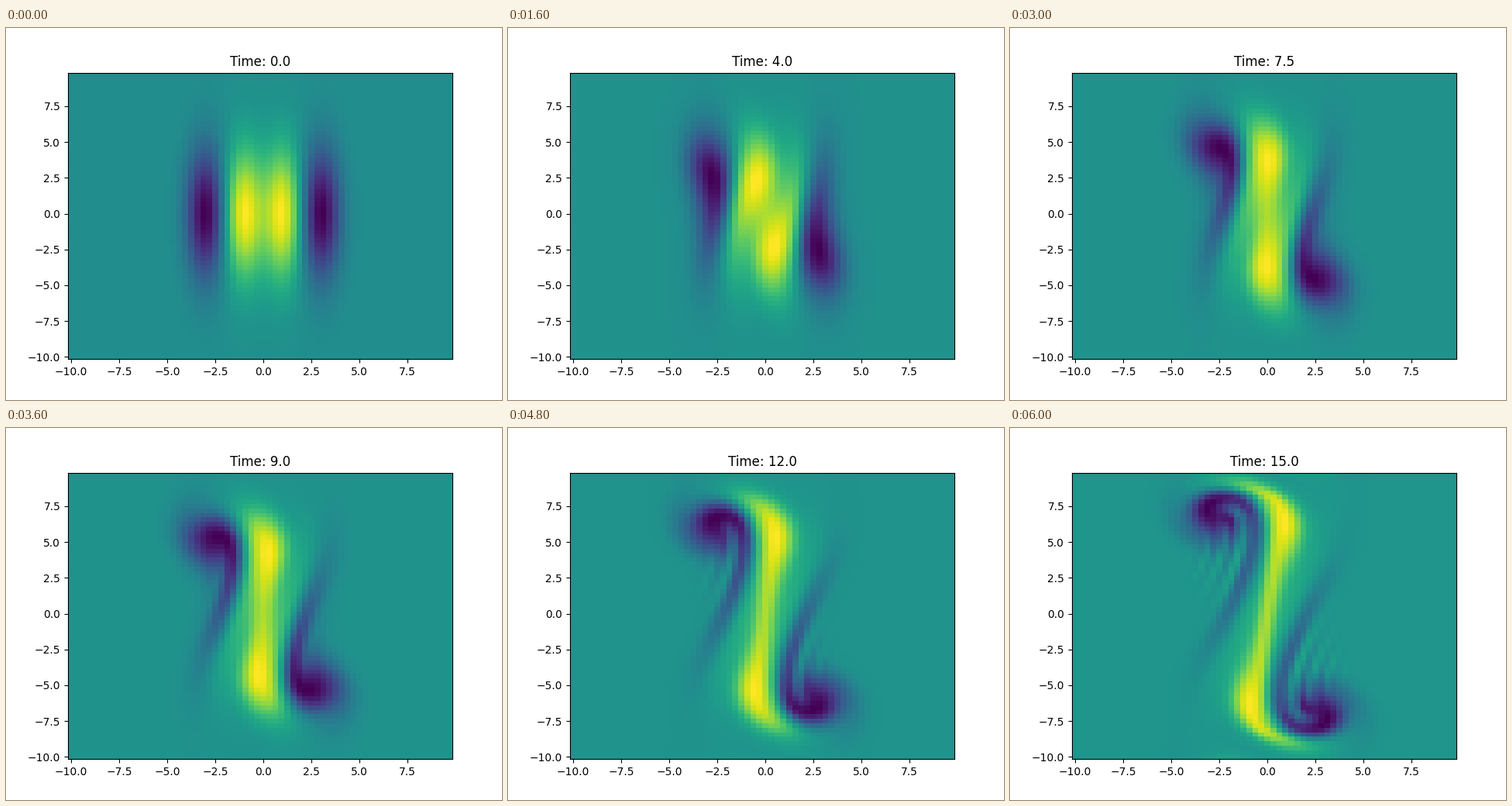
Recreate the animation shown at these times as a matplotlib script. Size 640x480 px, loop 6200 ms.

```python
import numpy as np
import matplotlib.pyplot as plt
from matplotlib.animation import FuncAnimation

N, HALF, NU = 64, 10, 0.001
STEP, FRAMES, SUB = 0.5, 31, 10

axis = np.linspace(-HALF, HALF, N, endpoint=False)
h = axis[1] - axis[0]
X, Y = np.meshgrid(axis, axis)

k = 2 * np.pi * np.fft.fftfreq(N, d=h)
KX, KY = np.meshgrid(k, k)
K2 = KX**2 + KY**2
K2[0, 0] = 1


def stream(w):
    """Solve the periodic Poisson equation for the stream function."""
    wh = np.fft.fft2(w)
    wh[0, 0] = 0
    return np.fft.ifft2(-wh / K2).real


def diff(f, ax):
    return (np.roll(f, -1, ax) - np.roll(f, 1, ax)) / (2 * h)


def laplace(f):
    return sum(np.roll(f, s, ax) for s in (-1, 1) for ax in (0, 1)) / h**2 - 4 * f / h**2


def rate(w):
    psi = stream(w)
    return diff(psi, 1) * diff(w, 0) - diff(psi, 0) * diff(w, 1) + NU * laplace(w)


def rk4(w, dt):
    a = rate(w)
    b = rate(w + dt / 2 * a)
    c = rate(w + dt / 2 * b)
    d = rate(w + dt * c)
    return w + dt / 6 * (a + 2 * b + 2 * c + d)


def strip(x0):
    return np.exp(-(X - x0) ** 2 - Y**2 / 20)


def simulate():
    w = strip(-1) + strip(1) - strip(-3) - strip(3)
    states = [w]
    for _ in range(FRAMES - 1):
        for _ in range(SUB):
            w = rk4(w, STEP / SUB)
        states.append(w)
    return states


states = simulate()

fig, ax = plt.subplots(figsize=(6.4, 4.8), dpi=100)
mesh = ax.pcolormesh(X, Y, states[0], cmap="viridis", shading="nearest")
title = ax.set_title("Time: 0.0")


def draw(i):
    w = states[i]
    mesh.set_array(w)
    mesh.set_clim(w.min(), w.max())
    title.set_text(f"Time: {i * STEP:.1f}")
    return mesh, title


anim = FuncAnimation(fig, draw, frames=FRAMES, interval=200, repeat=True, blit=False)
plt.show()
```
